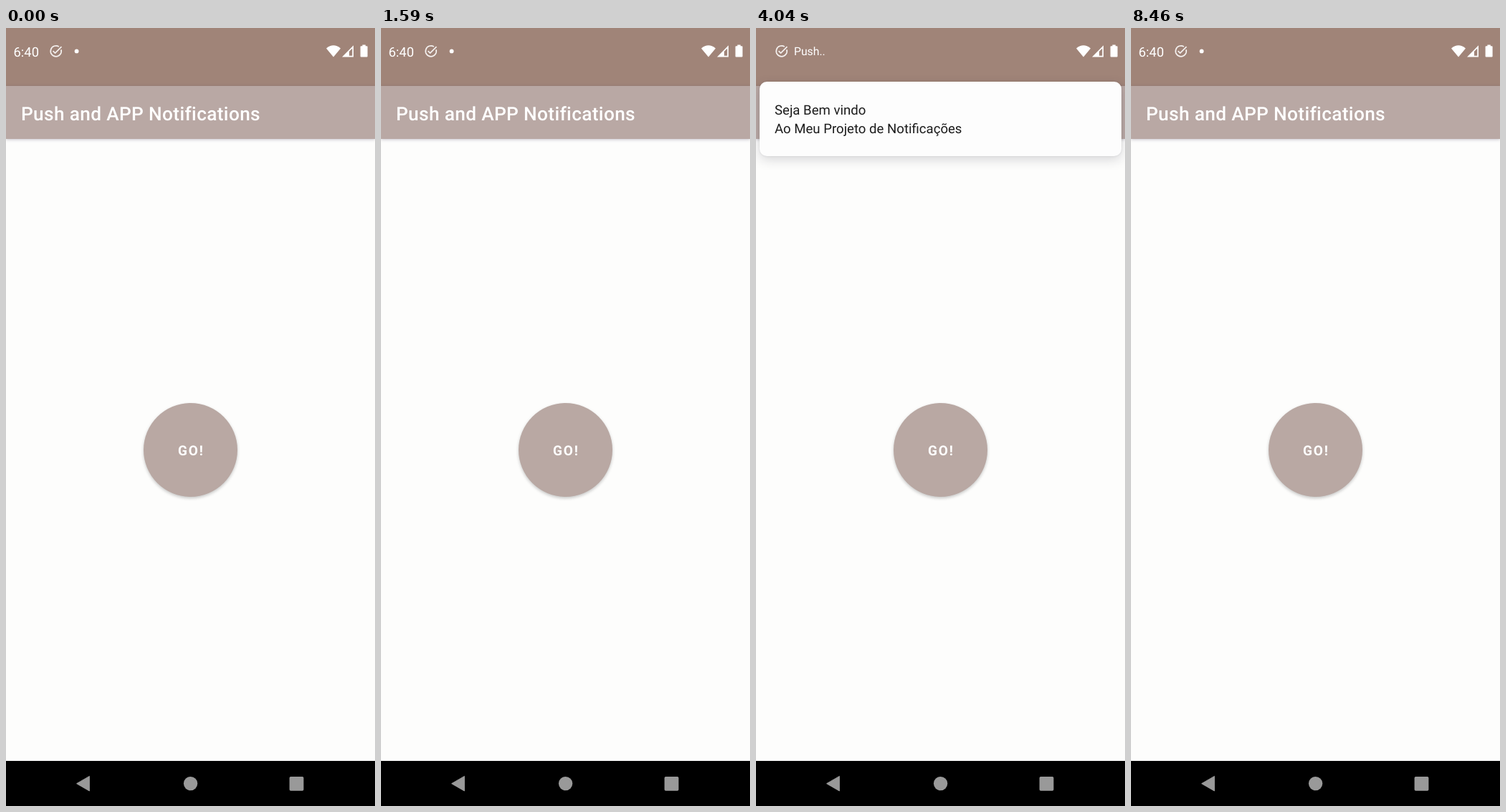
Animation of 515x1087 px, one loop 8.5 s. Source, as an HTML page:

```html
<!DOCTYPE html>
<html lang="pt">
<head>
<meta charset="utf-8">
<title>Notifications</title>
<style>
  html, body { margin: 0; width: 100%; height: 100%; overflow: hidden; background: #fdfdfc; }
  #stage { position: relative; width: 515px; height: 1087px; overflow: hidden; background: #fdfdfc; }
  #stage > * { position: absolute; }
  svg { left: 0; top: 0; display: block; overflow: visible; }
  text { font-family: Roboto, sans-serif; white-space: pre; text-rendering: geometricPrecision; }
  #status { left: 0; top: 0; width: 515px; height: 82px; background: #a08478; }
  #bar { left: 0; top: 81px; width: 515px; height: 74px; background: #b9a8a4;
    box-shadow: 0 1px 4px rgba(60, 50, 80, .28); }
  #go { left: 192px; top: 524px; width: 131.4px; height: 131.4px; border-radius: 50%;
    background: #b9a8a3; box-shadow: 0 2px 4px rgba(0, 0, 0, .22); }
  #nav { left: 0; top: 1024px; width: 515px; height: 63px; background: #000; }
  #card { overflow: hidden; border-radius: 10px; background: #fdfdfd;
    box-shadow: 0 5px 16px rgba(30, 30, 50, .17), 0 0 3px rgba(30, 30, 50, .1); }
  #card svg { position: absolute; }
</style>
</head>
<body>
<div id="stage">
  <div id="status"></div>
  <div id="bar"></div>
  <div id="go"></div>
  <div id="nav"></div>
  <svg width="515" height="1087" fill="#fff">
    <defs>
      <g id="check" fill="none" stroke="#f3efed" stroke-width="2.1">
        <path d="M20.6 9.4A9 9 0 1 1 17 4.5M7 11.6l3.6 3.6L21.3 4.5"/>
      </g>
    </defs>
    <g id="clock">
      <text x="10.5" y="39.7" font-size="18.4">6:40</text>
      <use href="#check" transform="translate(59.8 22.4) scale(.83)"/>
      <circle cx="98.6" cy="32.4" r="2.9"/>
    </g>
    <g id="ticker">
      <use href="#check" transform="translate(25.8 22.4) scale(.83)"/>
      <text x="53" y="38.4" font-size="15.75">Push..</text>
    </g>
    <path d="M457 40.5L447 28.4Q457 20 467 28.4Z"/>
    <path fill-rule="evenodd" d="M469 40.5L485 24.3V40.5ZM479 32.8V38.8H483.3V28.5Z"/>
    <path d="M497.4 25.2V23.6H501.8V25.2H503.6Q504.6 25.2 504.6 26.2V39.6Q504.6 40.6 503.6 40.6H495.6Q494.6 40.6 494.6 39.6V26.2Q494.6 25.2 495.6 25.2Z"/>
    <text x="21" y="128.8" font-size="26.25" font-weight="500" letter-spacing=".33">Push and APP Notifications</text>
    <text x="240" y="597" font-size="19" font-weight="700" letter-spacing="1.9">GO!</text>
    <g fill="#999">
      <path d="M98.6 1055.7L116.4 1045.4V1066Z" stroke="#999" stroke-linejoin="round"/>
      <circle cx="257.6" cy="1055.6" r="9.7"/>
      <rect x="395.6" y="1045.9" width="19.8" height="19.8" rx="1.8"/>
    </g>
  </svg>
  <div id="card">
    <svg id="message" width="515" height="200" fill="#1c1c1c" font-size="18.6">
      <text x="26" y="121">Seja Bem vindo</text>
      <text x="26" y="147">Ao Meu Projeto de Notificações</text>
    </svg>
  </div>
</div>
<script>
  const LOOP = 8500;
  const SHOW = { at: 2278, span: 360 };
  const HIDE = { at: 7300, span: 300 };
  const ICON = { left: 25, right: 42, top: 20, bottom: 64 };
  const OPEN = { left: 5, right: 510, top: 75, bottom: 178.5 };
  const LIFT = 4; // extra rise of the text inside the folded card

  const el = id => document.getElementById(id);
  const [clock, ticker, card, message] = ['clock', 'ticker', 'card', 'message'].map(el);
  const clamp = v => Math.min(1, Math.max(0, v));
  const progress = (t, step) => clamp((t - step.at) / step.span);

  // 0 = folded into the status icon, 1 = fully open
  function openness(t) {
    if (t < HIDE.at) return 1 - (1 - progress(t, SHOW)) ** 3;
    return 1 - progress(t, HIDE) ** 2;
  }

  function draw(t) {
    const p = openness(t);
    const at = side => ICON[side] + (OPEN[side] - ICON[side]) * p;
    const left = at('left'), top = at('top');

    Object.assign(card.style, {
      left: left + 'px',
      top: top + 'px',
      width: at('right') - left + 'px',
      height: at('bottom') - top + 'px',
      opacity: clamp(p * 2.5),
      visibility: p > 0 ? 'visible' : 'hidden'
    });
    message.style.left = -left + 'px';
    message.style.top = -OPEN.top - LIFT * (1 - p) + 'px';
    message.style.opacity = clamp(p * 1.18);

    clock.style.opacity = clamp(1 - p * 2.8);
    ticker.style.opacity = clamp(p * 2.8 - 1);
  }

  function tick() {
    draw(performance.now() % LOOP);
    requestAnimationFrame(tick);
  }
  tick();
</script>
</body>
</html>
```
